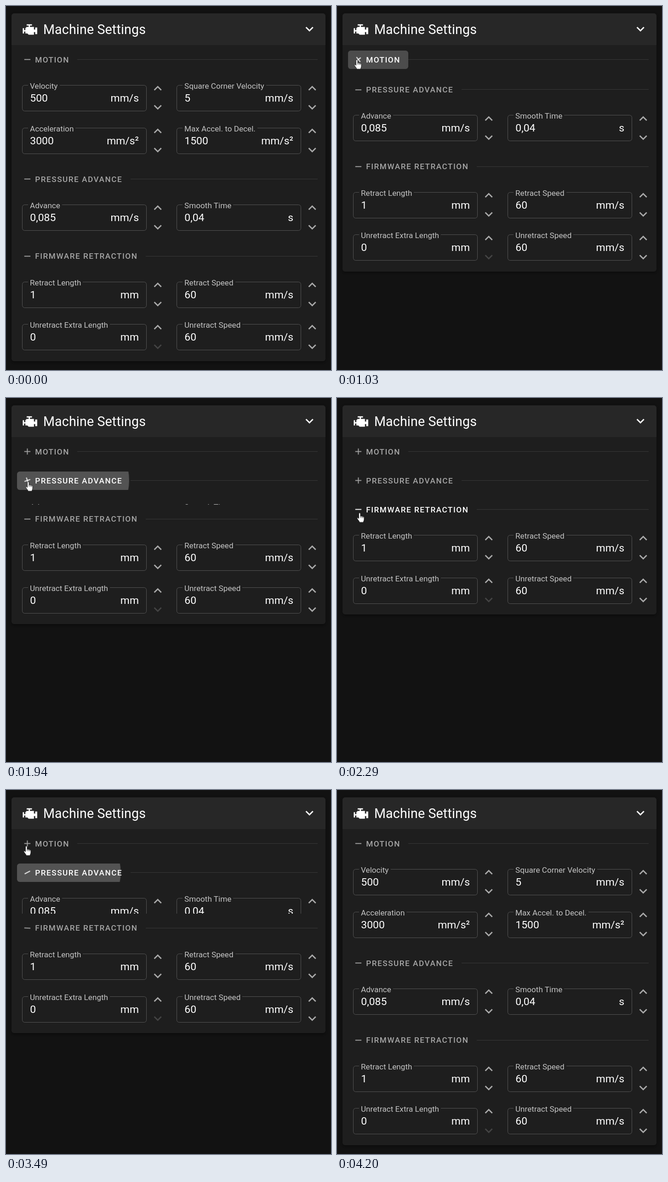
Animation of 707 by 792 pixels, one loop 4270 ms. Source, as an HTML page:

```html
<!DOCTYPE html>
<html lang="en">
<head>
<meta charset="utf-8">
<title>Machine Settings</title>
<style>
  html, body { margin: 0; width: 100%; height: 100%; overflow: hidden; background: #121212; }
  body { position: relative; font-family: Roboto, sans-serif; color: #fff; }
  svg, .field, .field span, .ripple { position: absolute; }
  .card {
    position: absolute; left: 12px; top: 16px; width: 682.5px; overflow: hidden;
    border-radius: 5.7px; background: #1e1e1e;
    box-shadow: 0 4px 1.4px -3px #0003, 0 3px 3px #0002, 0 1.4px 7px #0002;
  }
  header { position: relative; height: 69px; background: #272727; }
  h1 { position: absolute; left: 69px; top: 0; margin: 0; font: 400 28.6px/70.4px Roboto, sans-serif; letter-spacing: .15px; white-space: nowrap; }
  .head { display: flex; align-items: center; height: 63px; padding: 0 17px 0 11.7px; }
  .button { position: relative; height: 40px; padding: 0 17.5px 0 39.6px; border-radius: 5.7px; overflow: hidden; }
  .face { position: relative; display: block; font: 500 17.16px/40px Roboto, sans-serif; letter-spacing: .0893em; white-space: nowrap; opacity: .6; }
  .ripple { border-radius: 50%; background: #fff; opacity: 0; }
  .rule { flex: 1; height: 1px; background: #393939; }
  .content { position: relative; overflow: hidden; }
  .field { box-sizing: border-box; width: 271px; height: 57px; border: 1px solid #545454; border-radius: 5.7px; }
  .field span { white-space: nowrap; font-size: 22.9px; line-height: 56px; top: 0; }
  .field .label { left: 12px; top: -9px; padding: 0 4px; font-size: 17.16px; line-height: 21px; color: #c4c4c4; background: #1e1e1e; }
  .value { left: 16.3px; }
  .unit { right: 16px; }
  .cursor { left: 0; top: 0; overflow: visible; }
</style>
</head>
<body>
<script>
const LOOP = 4270;
const SWIFT = 'cubic-bezier(.25,.8,.5,1)';
const ICONS = {
  engine: 'M7 4V6H10V8H7L5 10V13H3V10H1V18H3V15H5V18H8L10 20H18V16H20V19H23V9H20V12H18V8H12V6H15V4Z',
  up: 'M7.41 15.41 12 10.83 16.59 15.41 18 14 12 8 6 14Z',
  down: 'M7.41 8.58 12 13.17 16.59 8.58 18 10 12 16 6 10Z',
};

// field: label, value, unit, lower limit reached
// close/open: start of each fold; press: [time, x, y] inside the button
const SECTIONS = [
  { title: 'MOTION', height: 197.2, close: 787, open: 3740,
    press: [[744, 19, 20], [3660, 19, 21]],
    glow: [[520, .6], [700, 1], [1130, 1], [1300, .6], [3530, .6], [3640, 1], [3940, 1], [4120, .6]],
    fields: [['Velocity', '500', 'mm/s'], ['Square Corner Velocity', '5', 'mm/s'],
             ['Acceleration', '3000', 'mm/s²'], ['Max Accel. to Decel.', '1500', 'mm/s²']] },
  { title: 'PRESSURE ADVANCE', height: 104.4, close: 1818, open: 3423,
    press: [[1740, 24, 22], [3349, 21, 20]],
    glow: [[1480, .6], [1690, 1], [1960, 1], [2160, .6], [3200, .6], [3300, 1], [3500, 1], [3700, .6]],
    fields: [['Advance', '0,085', 'mm/s'], ['Smooth Time', '0,04', 's']] },
  { title: 'FIRMWARE RETRACTION', height: 197.2, close: 2440, open: 3075,
    press: [[2370, 26, 23], [2995, 26, 21]],
    glow: [[2060, .6], [2240, 1], [2740, 1], [2860, .86], [2990, 1], [3180, 1], [3400, .6]],
    fields: [['Retract Length', '1', 'mm'], ['Retract Speed', '60', 'mm/s'],
             ['Unretract Extra Length', '0', 'mm', true], ['Unretract Speed', '60', 'mm/s']] },
];

const POINTER = [
  [260, 4, 119], [470, 28, 117], [680, 43, 115], [820, 43, 115], [1090, 43, 117],
  [1290, 50, 207], [1440, 51, 207], [1590, 50, 189], [1700, 48, 181], [1920, 48, 181],
  [2140, 49, 252], [2290, 49, 250], [2370, 50, 245], [2700, 51, 247], [2860, 52, 245],
  [3120, 50, 243], [3270, 46, 182], [3400, 45, 178], [3490, 44, 122], [3640, 43, 117],
  [3800, 42, 117], [3960, -30, 120],
];
// spans in which the pointer rests on a button
const HAND = [[430, 1130], [1190, 1265], [1500, 1975], [2050, 3165], [3220, 3405], [3460, 3850]];

const icon = (name, x, y, color = '#fff') =>
  `<svg style="left:${x}px;top:${y}px" width="34.3" height="34.3" viewBox="0 0 24 24"><path fill="${color}" d="${ICONS[name]}"/></svg>`;

const field = ([label, value, unit, atMin], i) => {
  const x = 23 + 336 * (i % 2), y = 24 + 92.7 * (i >> 1);
  return `<div class="field" style="left:${x}px;top:${y}px">
      <span class="label">${label}</span><span class="value">${value}</span><span class="unit">${unit}</span>
    </div>` + icon('up', x + 278.4, y - 9.8, '#a9a9a9') + icon('down', x + 278.4, y + 31.4, atMin ? '#444' : '#a9a9a9');
};

const section = s => `<section>
  <div class="head">
    <div class="button"><div class="ripple"></div><div class="face">
      <svg class="toggle" style="left:-28.2px;top:8.7px" width="22.9" height="22.9" viewBox="0 0 24 24" fill="#fff">
        <path d="M5 11H19V13H5Z"/><path class="bar" d="M11 5H13V19H11Z"/></svg>${s.title}</div></div>
    <div class="rule"></div>
  </div>
  <div class="content">${s.fields.map(field).join('')}</div>
</section>`;

document.body.innerHTML = `<div class="card">
  <header>${icon('engine', 23, 18)}<h1>Machine Settings</h1>${icon('down', 631.2, 17.3)}</header>
  ${SECTIONS.map(section).join('')}
</div>
<svg class="cursor" width="20" height="24" stroke="#111" stroke-width=".9" stroke-linejoin="round">
  <g class="hand" transform="translate(-6 -.6)">
    <path fill="#fff" d="M4.4 2.4a1.8 1.8 0 0 1 3.6 0V8c.6-.9 2.6-.8 3 .4.8-.7 2.3-.4 2.6.7 1-.5 2.4 0 2.4 1.4v4c0 2.5-1.2 4-1.8 6.6H6.2C5.5 18.5 2.5 15.8.9 13c-.8-1.6 1-2.7 2.2-1.5L4.4 13Z"/>
    <path fill="none" d="M8 8v3.4M11 8.6v3M13.6 9.3v2.6"/>
  </g>
  <path class="arrow" fill="#fff" d="M0 0V16.5L3.8 13 6.3 18.8 8.8 17.7 6.3 12H11.6Z"/>
</svg>`;

const tracks = [];

// steps: [ms, properties, easing towards the next step]
function track(el, steps) {
  const first = steps[0], last = steps[steps.length - 1];
  const frames = [[0, first[1]], ...steps, [LOOP, last[1]]]
    .map(([ms, props, easing = 'linear']) => ({ ...props, offset: ms / LOOP, easing }));
  const anim = el.animate(frames, { duration: LOOP, fill: 'both' });
  anim.pause();
  tracks.push(anim);
}

// shows `on` inside the spans and `off` elsewhere, without blending
const toggle = (el, spans, on, off) =>
  track(el, spans.flatMap(([a, b]) => [[a, off], [a, on], [b, on], [b, off]]));

// moves from one pose to another and back again
const fold = (el, s, from, to, length, easing) => track(el, [
  [s.close, from, easing], [s.close + length, to], [s.open, to, easing], [s.open + length, from],
]);

function addRipple(el, button, press) {
  const w = button.offsetWidth, h = button.offsetHeight, r = Math.hypot(w, h) / 2;
  Object.assign(el.style, {
    width: 2 * r + 'px', height: 2 * r + 'px', left: w / 2 - r + 'px', top: h / 2 - r + 'px',
  });
  track(el, press.flatMap(([t, x, y]) => [
    [t, { transform: `translate(${x - w / 2}px, ${y - h / 2}px) scale(.3)` }, 'cubic-bezier(0,0,.2,1)'],
    [t + 250, { transform: 'translate(0px, 0px) scale(1)' }],
    [t + 600, { transform: 'translate(0px, 0px) scale(1)' }],
  ]));
  track(el, press.flatMap(([t]) => [
    [t, { opacity: 0 }], [t + 50, { opacity: .24 }],
    [t + 250, { opacity: .24 }, 'ease'], [t + 550, { opacity: 0 }],
  ]));
}

document.querySelectorAll('section').forEach((el, i) => {
  const s = SECTIONS[i], find = q => el.querySelector(q);
  fold(find('.content'), s, { height: s.height + 'px' }, { height: '0px' }, 300, SWIFT);
  fold(find('.toggle'), s, { transform: 'rotate(0deg)' }, { transform: 'rotate(180deg)' }, 500, 'ease');
  toggle(find('.bar'), [[s.close, s.open]], { opacity: 1 }, { opacity: 0 });
  track(find('.face'), s.glow.map(([t, opacity]) => [t, { opacity }]));
  addRipple(find('.ripple'), find('.button'), s.press);
});

const cursor = document.querySelector('.cursor');
const place = (x, y) => ({ transform: `translate(${x}px, ${y}px)` });
track(cursor, [[260, place(-40, 119)], ...POINTER.map(([t, x, y]) => [t, place(x, y), 'ease-in-out'])]);
toggle(cursor.querySelector('.hand'), HAND, { opacity: 1 }, { opacity: 0 });
toggle(cursor.querySelector('.arrow'), HAND, { opacity: 0 }, { opacity: 1 });

// the picture advances in steps of 70 ms after an opening rest
function hold(t) {
  if (t < 260) return 0;
  const base = 260 + (t >= 2860 ? 10 : 0) + (t >= 4000 ? 10 : 0);
  return base + Math.floor((t - base) / 70) * 70;
}

let start;
function tick(now) {
  start ??= now;
  const t = hold((now - start) % LOOP);
  for (const anim of tracks) anim.currentTime = t;
  requestAnimationFrame(tick);
}
requestAnimationFrame(tick);
</script>
</body>
</html>
```
